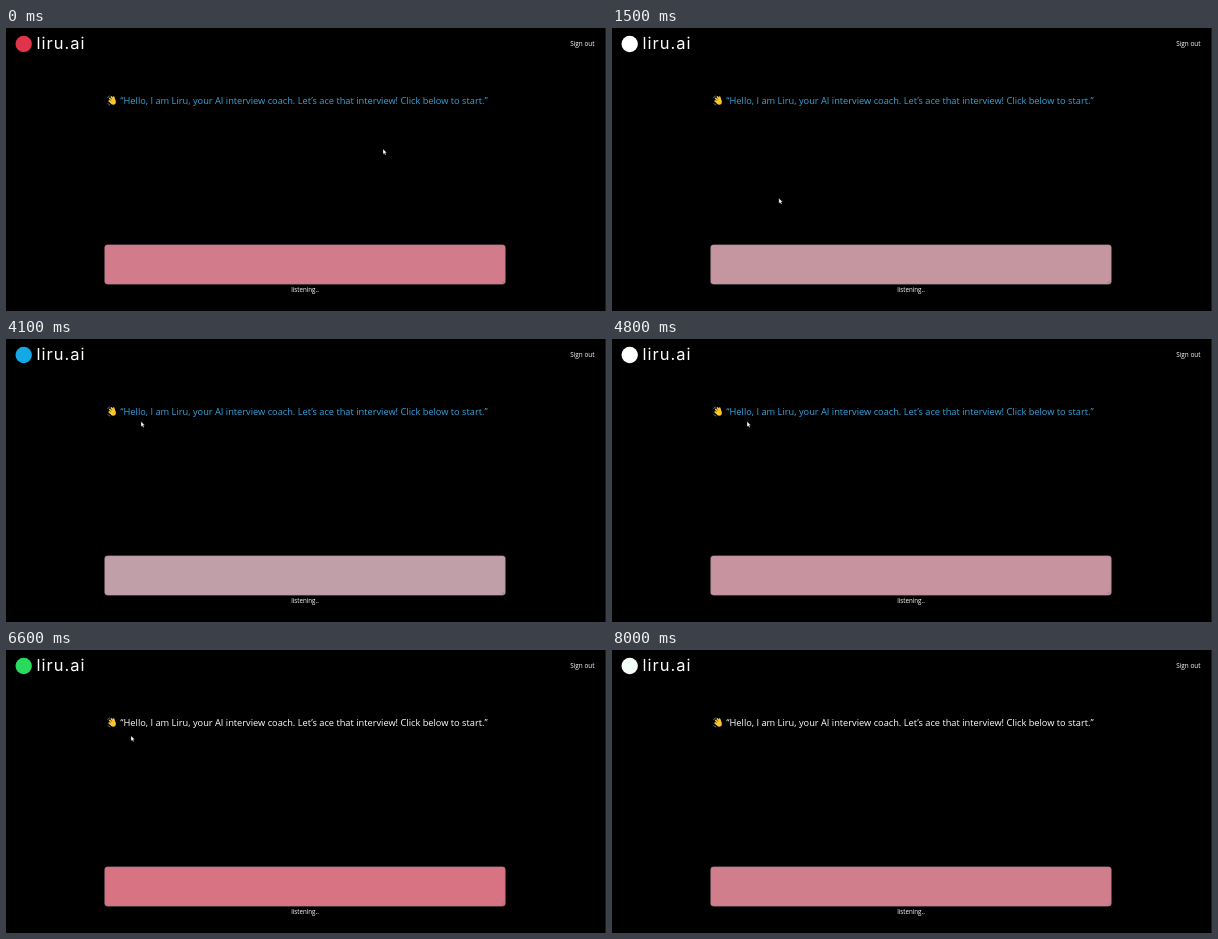
Animation, 600 px wide and 283 px high, one loop 8100 ms. Source, as an HTML page:

```html
<!DOCTYPE html>
<html lang="en">
<head>
<meta charset="utf-8">
<title>Interview coach</title>
<style>
  html, body { margin: 0; width: 100%; height: 100%; overflow: hidden; background: #000; }
  svg { display: block; width: 100%; height: 100%; }
  text { font-family: "Open Sans", "Noto Sans", sans-serif; fill: #fff; }
  .brand { font: 400 16.5px Inter, sans-serif; letter-spacing: 1px; }
</style>
</head>
<body>
<svg viewBox="0 0 600 283">
  <path d="M599.6 0v283" stroke="#282828" stroke-width=".8"/>
  <circle id="dot" cx="17.7" cy="16" r="8.2"/>
  <text class="brand" x="30.5" y="21.3">liru.ai</text>
  <text x="564.2" y="18.4" font-size="6.4">Sign out</text>

  <g transform="translate(-.6 0)" fill="none" stroke="#fbc52d" stroke-linecap="round" stroke-width="1.7">
    <path d="M104.3 70.5l3 3M106 69l2.5 3.5M108.2 69l1 3.5M103.8 73l3 2.2"/>
    <ellipse cx="107.8" cy="74" rx="1.8" ry="1.9" fill="#fbc52d"/>
    <path d="M102.2 69.8q.5-1.4 1.8-1.9M104.5 77q-1.5-.3-2-1.4" stroke="#4a8c96" stroke-width=".9"/>
  </g>
  <text id="hello" x="114.3" y="75.9" font-size="9.25">“Hello, I am Liru, your AI interview coach. Let’s ace that interview! Click below to start.”</text>

  <rect id="box" x="98.6" y="216.8" width="400.8" height="39.5" rx="3" stroke="#777" stroke-opacity=".5" stroke-width=".6"/>
  <path d="M495.5 255l2.5-2.5M497 255l1-1" stroke="#777" stroke-width=".5"/>
  <text x="299" y="263.8" font-size="6.2" text-anchor="middle">listening..</text>

  <path id="cursor" d="M0 0v5.2l1.2-1 .9 1.9 1-.5-.9-1.8h1.6z" fill="#fff" stroke="#000" stroke-width=".3"/>
</svg>
<script>
const LOOP = 8100, STEP = 100, BEAT = 1370;
const [dot, hello, box, cursor] =
  ["dot", "hello", "box", "cursor"].map(id => document.getElementById(id));

const white = [255, 255, 255], red = [224, 52, 74], blue = [18, 169, 230], green = [42, 218, 92];
const rose = [225, 95, 113], pale = [192, 159, 169];

// One point per beat
const stops = [[377, 121], [171, 170], [7.5, 178], [135, 82.5], [135, 82.5], [124, 86]];
const levels = [.44, .87, 0, 1, .64, .28, .5].map(v => [v]);

const mix = (a, b, k) => a.map((v, i) => v + (b[i] - v) * k);
const clamp = k => Math.max(0, Math.min(1, k));
const rgb = c => `rgb(${c.map(Math.round)})`;

function glide(points, t) {
  const i = Math.min(Math.floor(t / BEAT), points.length - 1);
  const k = t / BEAT - i;
  return mix(points[i], points[i + 1] || points[i], k * k * (3 - 2 * k));
}

// Fades from white to each hue in turn and back
function dotColor(t) {
  const turn = (t - 300) / 3300;
  const hue = [red, blue, green][Math.abs(Math.round(turn))];
  return mix(white, hue, clamp(.5 + .9 * Math.cos(2 * Math.PI * turn)));
}

function draw(now) {
  const t = Math.floor(now % LOOP / STEP) * STEP;
  dot.style.fill = rgb(dotColor(t));
  box.style.fill = rgb(mix(rose, pale, glide(levels, t)[0]));
  hello.style.fill = (t + 400) % 4300 < 2150 ? "#36a3dd" : "#fff";
  cursor.setAttribute("transform", `translate(${glide(stops, t)})`);
  cursor.style.display = t < 7400 ? "" : "none";
}

const start = performance.now();
function tick() {
  draw(performance.now() - start);
  requestAnimationFrame(tick);
}
tick();
</script>
</body>
</html>
```
